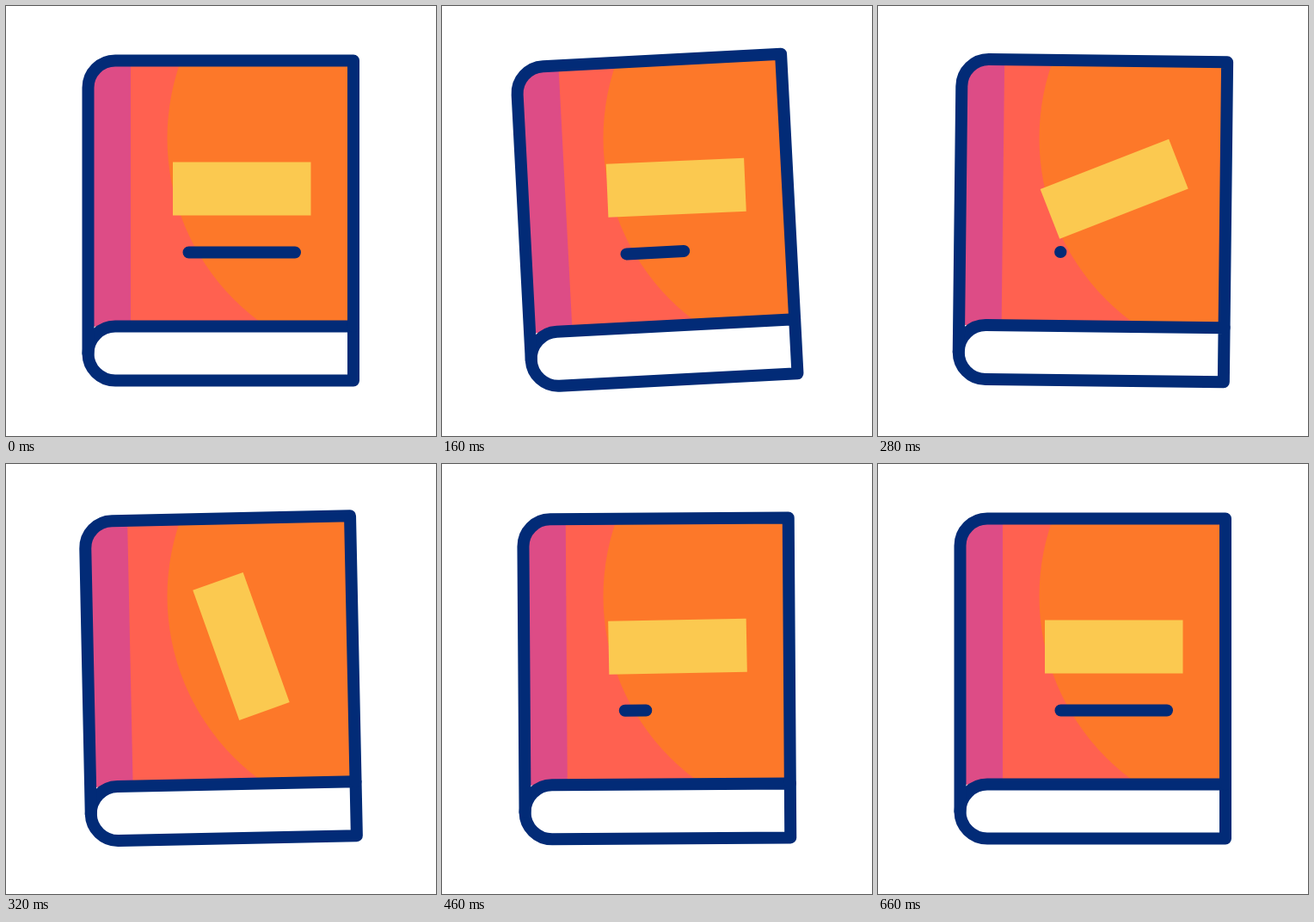
An HTML page with a canvas that plays this animation: 500x500 px, repeating every 1420 ms.

```html
<!DOCTYPE html>
<html>
<head>
<meta charset="utf-8">
<title>Book</title>
<style>
html, body { margin: 0; width: 100%; height: 100%; overflow: hidden; background: #fff; }
canvas { display: block; width: 500px; height: 500px; }
</style>
</head>
<body>
<canvas id="stage" width="500" height="500"></canvas>
<script>
const ctx = document.getElementById('stage').getContext('2d');
const LOOP = 1420;
const NAVY = '#022b77', PINK = '#dd4c86', CORAL = '#ff6150', ORANGE = '#fd7829', YELLOW = '#fbc950';

const smooth = u => u * u * (3 - 2 * u);
const cubic = u => u < .5 ? 4 * u ** 3 : 1 - 4 * (1 - u) ** 3;
const progress = (t, from, to) => Math.min(1, Math.max(0, (t - from) / (to - from)));

// keys: [time, value, easing into this key]
function track(t, keys) {
  let value = keys[0][1];
  for (let i = 1; i < keys.length; i++) {
    const [start, a] = keys[i - 1], [end, b, ease = smooth] = keys[i];
    if (t >= start) value = a + (b - a) * ease(progress(t, start, end));
  }
  return value;
}

const tiltKeys = [[0, 0], [100, -6.8], [233, 1.9], [369, -2.45], [492, 0]];
const spinKeys = [[0, 0], [82, -10], [493, 360, cubic]];
const lineKeys = [[25, 1], [305, 0, cubic], [343, 0], [664, 1, cubic]];

function rotate(deg, x, y) {
  ctx.translate(x, y);
  ctx.rotate(deg * Math.PI / 180);
  ctx.translate(-x, -y);
}

function rect(color, x, y, w, h) {
  ctx.fillStyle = color;
  ctx.fillRect(x, y, w, h);
}

function cover(tilt) {
  ctx.save();
  ctx.beginPath();
  ctx.roundRect(95.5, 63.5, 308.5, 309, [31.5, 0, 0, 0]);
  ctx.clip();
  rect(CORAL, 90, 60, 320, 320);
  rect(PINK, 90, 60, 55, 330);
  // the orange disc stays still while the book tilts
  rotate(-tilt, 250, 250);
  ctx.fillStyle = ORANGE;
  ctx.beginPath();
  ctx.arc(452.5, 153.8, 265, 0, 7);
  ctx.fill();
  ctx.restore();
}

const pages = new Path2D('M404 372.5H127a31.5 31.5 0 0 0 0 63H404Z');
const outline = new Path2D('M404 372.5V63.5H127A31.5 31.5 0 0 0 95.5 95V404');

function draw(t) {
  const tilt = track(t, tiltKeys), length = track(t, lineKeys);
  rect('#fff', 0, 0, 500, 500);
  ctx.save();
  rotate(tilt, 250, 250);
  ctx.strokeStyle = NAVY;
  ctx.lineWidth = 14;
  ctx.lineCap = ctx.lineJoin = 'round';
  cover(tilt);
  ctx.fillStyle = '#fff';
  ctx.fill(pages);
  ctx.stroke(pages);
  ctx.stroke(outline);

  if (length > 0) {
    ctx.beginPath();
    ctx.moveTo(212.5, 286.5);
    ctx.lineTo(212.5 + 123.5 * length, 286.5);
    ctx.stroke();
  }
  rotate(track(t, spinKeys), 274.25, 212.5);
  rect(YELLOW, 194, 181.5, 160.5, 62);
  ctx.restore();
}

const begin = performance.now();
function frame() {
  draw((performance.now() - begin) % LOOP);
  requestAnimationFrame(frame);
}
frame();
</script>
</body>
</html>
```
